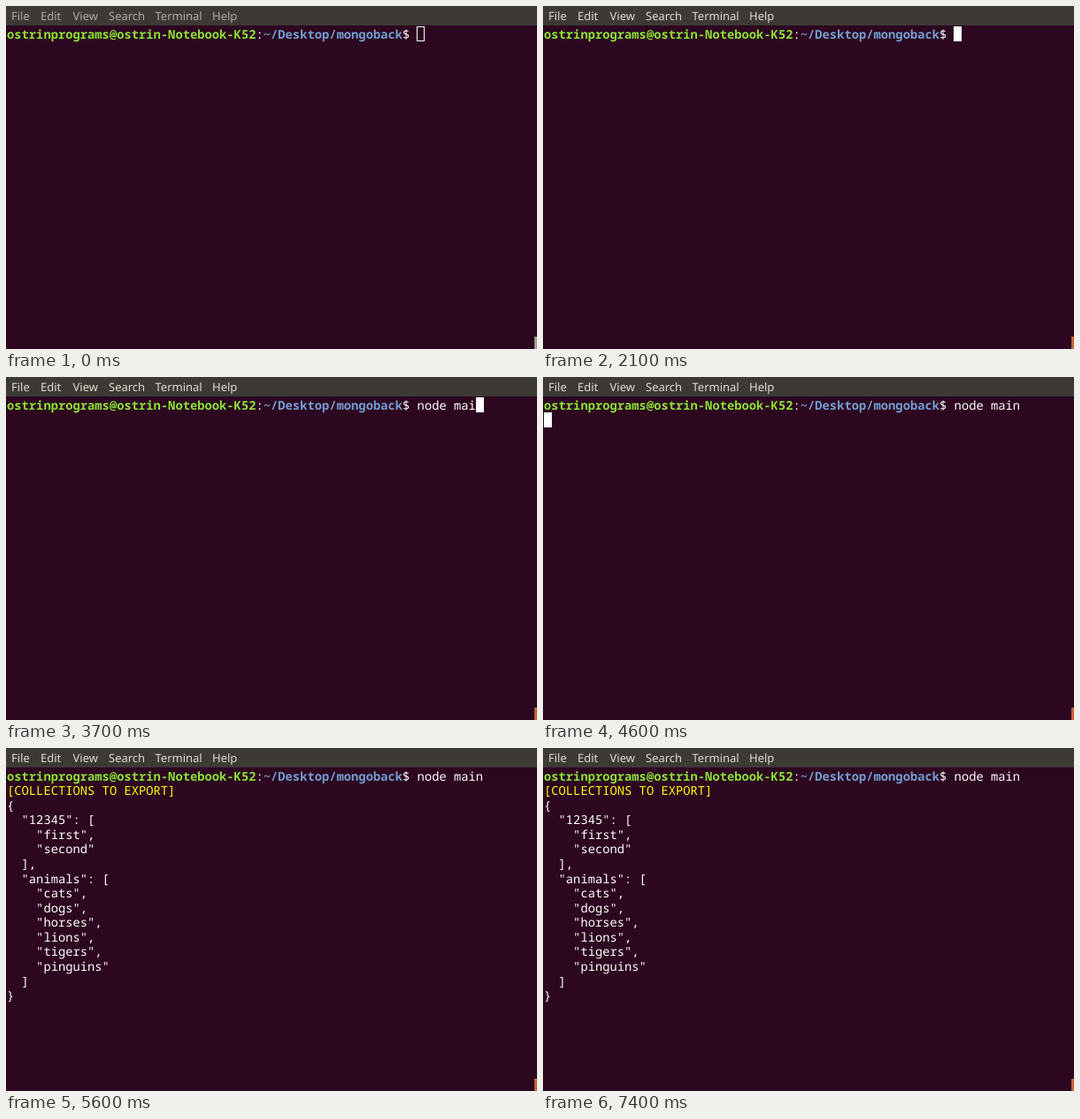
An HTML page for the animation above (8000 ms loop, 600 by 388 pixels).

```html
<!DOCTYPE html>
<html lang="en">
<head>
<meta charset="utf-8">
<style>
  html, body { margin: 0; width: 600px; height: 388px; overflow: hidden; background: #2d0620; }
  body { position: relative; text-rendering: geometricPrecision; }
  #menu { position: absolute; inset: 0 0 auto; height: 22px; background: #3d3a36; color: #aeaaa3;
    font: 13px/23px "Noto Sans", sans-serif; }
  #menu span { position: absolute; top: 0; }
  pre { position: absolute; left: 1px; top: 24.5px; margin: 0; color: #fff;
    font: 13.8px/16.58px "Noto Sans Mono", monospace; }
  b { color: #8ae234; }
  b.path { color: #729fcf; }
  i { color: #ff0; font-style: normal; }
  #cursor { position: absolute; box-sizing: border-box; width: 9px; height: 17px; border: 1px solid #fff; }
  #thumb { position: absolute; left: 597px; top: 374px; width: 3px; height: 14px; background: #a29d9a; }
  .focus #menu { color: #dfdbd2; }
  .focus #cursor { background: #fff; }
  .focus #thumb { background: #cb6036; }
</style>
</head>
<body>
<div id="menu"></div>
<pre><b>ostrinprograms@ostrin-Notebook-K52</b>:<b class="path">~/Desktop/mongoback</b>$ <span id="command"></span>
<span id="output"><i>[COLLECTIONS TO EXPORT]</i>
<span id="json"></span></span></pre>
<div id="cursor"></div>
<div id="thumb"></div>
<script>
const $ = id => document.getElementById(id);
const LOOP = 8000, FOCUS = 1200, ENTER = 4200, PRINT = 4800;
const COLUMN = 8.28, ROW = 16.58, PROMPT_LENGTH = 56, OUTPUT_ROWS = 16;
const COMMAND = 'node main';
const KEY_TIMES = [2200, 2400, 2600, 2800, 3000, 3200, 3500, 3700, 3900];
const CURSOR_OFF = [[1800, 2000], [5100, 5700], [6200, 6800], [7300, 8000]];

const menu = { File: 6, Edit: 39, View: 75.5, Search: 116, Terminal: 168.5, Help: 233 };
for (const [label, x] of Object.entries(menu)) {
  const item = document.createElement('span');
  item.textContent = label;
  item.style.left = x + 'px';
  $('menu').append(item);
}

$('json').textContent = JSON.stringify({
  12345: ['first', 'second'],
  animals: ['cats', 'dogs', 'horses', 'lions', 'tigers', 'pinguins']
}, null, 2);

function draw(time) {
  const typed = KEY_TIMES.filter(t => t <= time).length;
  const entered = time >= ENTER, printed = time >= PRINT;
  const column = entered ? 0 : PROMPT_LENGTH + typed;
  const row = printed ? OUTPUT_ROWS : entered ? 1 : 0;
  const hidden = CURSOR_OFF.some(([from, to]) => time >= from && time < to);

  document.body.classList.toggle('focus', time >= FOCUS);
  $('command').textContent = COMMAND.slice(0, typed);
  $('output').style.visibility = printed ? 'visible' : 'hidden';
  $('cursor').style.left = Math.round(.6 + column * COLUMN) + 'px';
  $('cursor').style.top = Math.round(23 + row * ROW) + 'px';
  $('cursor').style.visibility = hidden ? 'hidden' : 'visible';
}

const start = performance.now();
function tick() {
  draw((performance.now() - start) % LOOP);
  requestAnimationFrame(tick);
}
tick();
</script>
</body>
</html>
```
